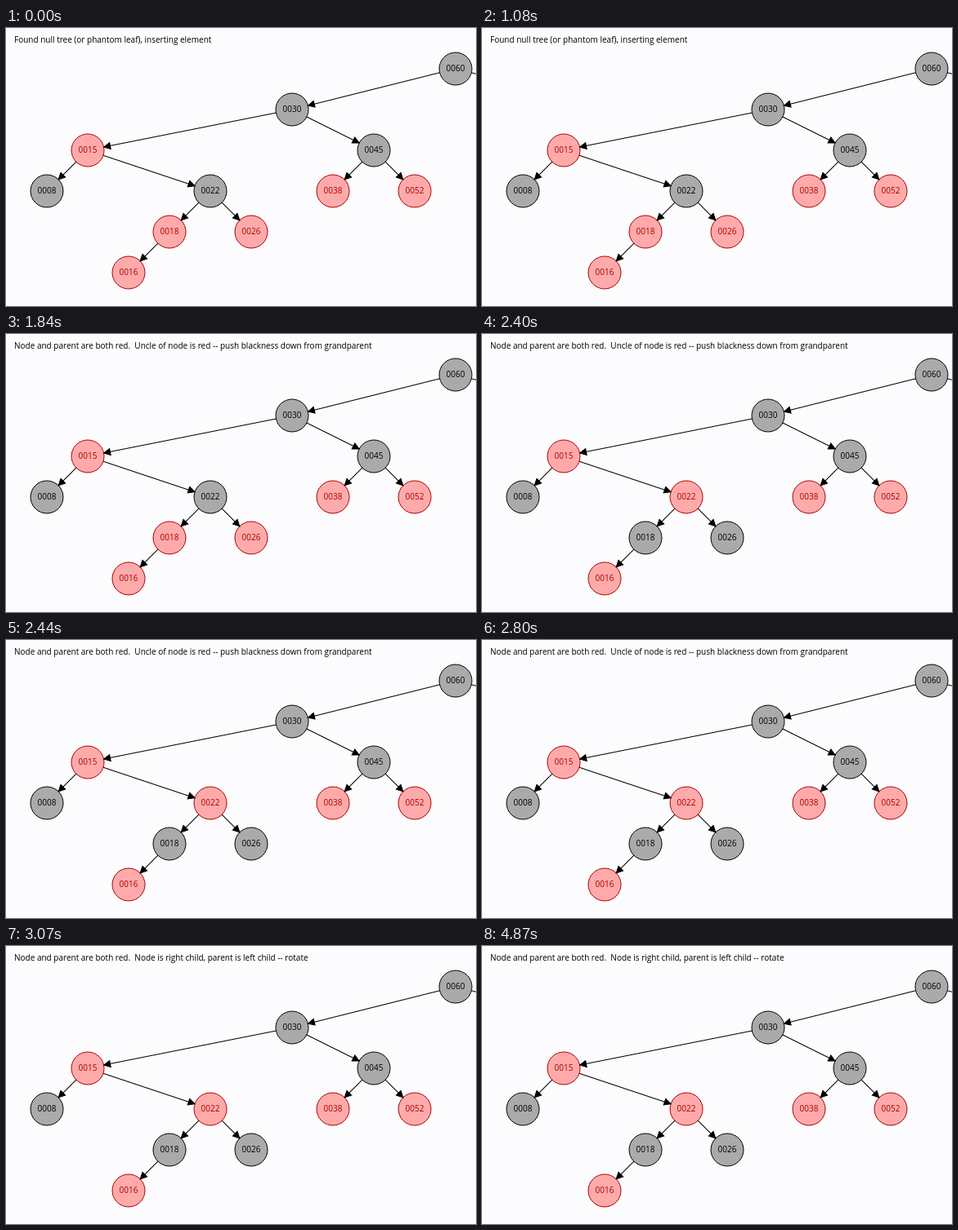
Animation of 575x341 px, one loop 6070 ms. Source, as an HTML page with a canvas:

```html
<!DOCTYPE html>
<html lang="en">
<head>
<meta charset="utf-8">
<title>Red-black tree insertion</title>
<style>
  html, body { margin: 0; width: 100%; height: 100%; overflow: hidden; background: #fcfcfe; }
  canvas { display: block; }
</style>
</head>
<body>
<canvas id="stage" width="575" height="341"></canvas>
<script>
const canvas = document.getElementById("stage");
const ctx = canvas.getContext("2d");
const LOOP = 6070;
const SPACING = 50;
const RADIUS = 20;

const RED = { fill: "#ffaaaa", ink: "#aa0000" };
const BLACK = { fill: "#aaaaaa", ink: "#000000" };

const steps = [
  { from: 0, text: "Found null tree (or phantom leaf), inserting element" },
  { from: 1800, text: "Node and parent are both red.  Uncle of node is red -- push blackness down from grandparent" },
  { from: 3040, text: "Node and parent are both red.  Node is right child, parent is left child -- rotate" }
];
const PUSH_BLACKNESS_AT = 2400;

function insert(parent, value) {
  const side = value < parent.value ? "left" : "right";
  if (parent[side]) insert(parent[side], value);
  else parent[side] = { value, depth: parent.depth + 1 };
}

const inOrder = node => node ? [...inOrder(node.left), node, ...inOrder(node.right)] : [];

// The right subtree of the root lies beyond the stage.
const root = { value: 60, depth: 0 };
[30, 90, 15, 45, 75, 8, 22, 38, 52, 68, 82, 18, 26, 16].forEach(value => insert(root, value));

// In-order rank sets the column, depth sets the row.
const nodes = inOrder(root);
nodes.forEach((node, rank) => {
  node.x = (rank + 1) * SPACING;
  node.y = (node.depth + 1) * SPACING;
  node.red = [15, 16, 18, 26, 38, 52].includes(node.value);
});
const grandparent = nodes.find(node => node.value === 22);
const recolored = [grandparent, grandparent.left, grandparent.right];

function drawNode(node, time) {
  const flipped = time >= PUSH_BLACKNESS_AT && recolored.includes(node);
  const color = node.red !== flipped ? RED : BLACK;
  ctx.beginPath();
  ctx.arc(node.x, node.y, RADIUS, 0, Math.PI * 2);
  ctx.fillStyle = color.fill;
  ctx.fill();
  ctx.strokeStyle = color.ink;
  ctx.stroke();
  ctx.fillStyle = color.ink;
  ctx.textAlign = "center";
  ctx.fillText(String(node.value).padStart(4, "0"), node.x, node.y + 3);
}

function drawEdge(parent, child) {
  const dx = child.x - parent.x;
  const dy = child.y - parent.y;
  const tip = Math.hypot(dx, dy) - RADIUS;
  ctx.save();
  ctx.translate(parent.x, parent.y);
  ctx.rotate(Math.atan2(dy, dx));
  ctx.strokeStyle = ctx.fillStyle = "#000";
  ctx.beginPath();
  ctx.moveTo(RADIUS, 0);
  ctx.lineTo(tip, 0);
  ctx.stroke();
  ctx.beginPath();
  ctx.moveTo(tip - 8, -4);
  ctx.lineTo(tip, 0);
  ctx.lineTo(tip - 8, 4);
  ctx.closePath();
  ctx.fill();
  ctx.stroke();
  ctx.restore();
}

function draw(time) {
  ctx.clearRect(0, 0, canvas.width, canvas.height);
  ctx.font = '10px "Open Sans", sans-serif';
  nodes.forEach(node => drawNode(node, time));
  for (const node of nodes) {
    if (node.left) drawEdge(node, node.left);
    if (node.right) drawEdge(node, node.right);
  }
  ctx.fillStyle = BLACK.ink;
  ctx.textAlign = "left";
  ctx.fillText(steps.findLast(step => time >= step.from).text, 10, 18);
}

const start = performance.now();
function tick() {
  draw((performance.now() - start) % LOOP);
  requestAnimationFrame(tick);
}
tick();
</script>
</body>
</html>
```
